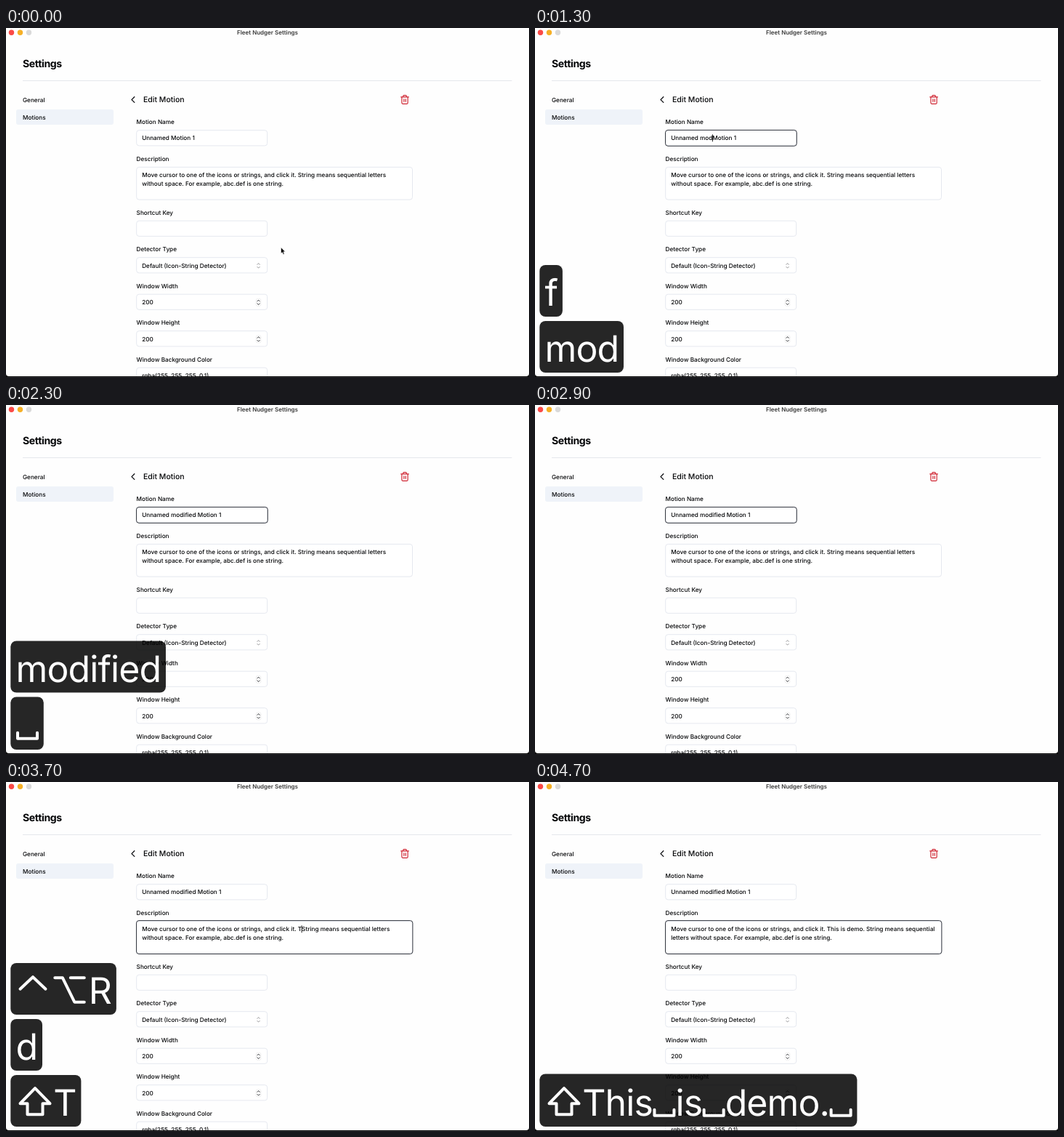
These frames come from a looping animation (720x480 px, 4800 ms). An HTML page:

```html
<!DOCTYPE html>
<html lang="en">
<head>
<meta charset="utf-8">
<title>Settings</title>
<style>
html, body { margin: 0; width: 100%; height: 100%; overflow: hidden; background: #fff; }
svg { display: block; width: 720px; height: 480px; }
text { font: 450 8.2px Inter, sans-serif; fill: #050608; white-space: pre; text-rendering: geometricPrecision; }
.label { font-weight: 540; }
.title { font-size: 8px; font-weight: 600; fill: #3a3a3a; text-anchor: middle; }
.h1 { font-size: 14.1px; font-weight: 700; letter-spacing: -.03em; }
.h2 { font-size: 10.5px; font-weight: 540; }
.key { font-size: 50px; font-weight: 400; letter-spacing: -.9px; fill: #fff; }
.box { fill: #fff; stroke: #e2e6ee; stroke-width: .9; }
.ring { fill: none; stroke: #33363e; stroke-width: 1; }
.line { fill: none; stroke: #0b0c10; stroke-linecap: round; stroke-linejoin: round; }
.glyph { fill: none; stroke: #fff; stroke-width: 4; stroke-linejoin: round; stroke-linecap: round; }
</style>
</head>
<body>
<svg viewBox="0 0 720 480" xml:space="preserve">
<clipPath id="win"><path d="M0 0H720V475Q720 479 716 479H4Q0 479 0 475Z"/></clipPath>
<rect width="720" height="480" fill="#0a0a0a"/>
<g clip-path="url(#win)">
<rect width="720" height="480" fill="#fefefe"/>
<circle cx="7.5" cy="6.3" r="3.7" fill="#fb4a47"/>
<circle cx="19.5" cy="6.3" r="3.7" fill="#f6b026"/>
<circle cx="31.5" cy="6.3" r="3.7" fill="#dadada"/>
<text class="title" x="360" y="8.9">Fleet Nudger Settings</text>
<text class="h1" x="22.9" y="53.7">Settings</text>
<path d="M23 72.5H696.5" stroke="#e5e7ec"/>
<rect x="14" y="112" width="134" height="21" rx="3" fill="#eff3f9"/>
<text class="label" x="23" y="101.5">General</text>
<text class="label" x="23" y="125.5">Motions</text>
<path class="line" d="M176.8 94.8L173 98.6L176.8 102.4" stroke-width="1.3"/>
<text class="h2" x="189" y="102.1">Edit Motion</text>
<path class="line" transform="translate(542 91.4) scale(.586)" style="stroke:#cf2330" stroke-width="2"
 d="M3 6h18M19 6v14c0 1-1 2-2 2H7c-1 0-2-1-2-2V6M8 6V4c0-1 1-2 2-2h4c1 0 2 1 2 2v2M10 11v6M14 11v6"/>
<g id="form"></g>
<g id="live"></g>
</g>
<g id="keys"></g>
<text id="probe" visibility="hidden"></text>
</svg>
<script>
const $ = id => document.getElementById(id);
const text = (s, x, y, cls = '') => `<text class="${cls}" x="${x}" y="${y}">${s}</text>`;
const rect = (x, y, w, h, cls) => `<rect class="${cls}" x="${x}" y="${y}" width="${w}" height="${h}" rx="3.5"/>`;
const line = (d, width = 1) => `<path class="line" d="${d}" stroke-width="${width}"/>`;
const clamp = v => Math.max(0, Math.min(1, v));

function measure(s, cls = '') {
  const probe = $('probe');
  probe.setAttribute('class', cls);
  probe.textContent = s;
  return probe.getComputedTextLength();
}

const LEFT = 187.2;
const arrows = y => line(`M345.9 ${y - 1.5}l1.7 -1.8l1.7 1.8M345.9 ${y + 1.5}l1.7 1.8l1.7 -1.8`, .8);
const spinner = y => `<rect x="344.4" y="${y - 5}" width="6.4" height="10" rx="2" fill="#fff" stroke="#e3e3e3" stroke-width=".6"/>` + arrows(y);

const fields = [
  ['Shortcut Key', ''],
  ['Detector Type', 'Default (Icon-String Detector)', y => `<g opacity=".5">${arrows(y)}</g>`],
  ['Window Width', '200', spinner],
  ['Window Height', '200', spinner],
  ['Window Background Color', 'rgba(255, 255, 255, 0.1)']
];
$('form').innerHTML =
  text('Motion Name', 179.6, 131.9, 'label') + rect(179.7, 140.7, 180, 21.2, 'box') +
  text('Description', 179.6, 182.6, 'label') + rect(179.7, 191.4, 379.8, 44.7, 'box') +
  fields.map(([label, value, extra], i) => {
    const y = 256.6 + i * 50.5;
    return text(label, 179.6, y, 'label') + rect(179.7, y + 8.6, 180, 21.2, 'box') +
      text(value, LEFT, y + 22.5) + (extra ? extra(y + 19.8) : '');
  }).join('');

// Key symbols: advance width and outline from the baseline
const symbols = {
  '^': [50.8, 'M6 -20.5L23.5 -37L41 -20.5'],
  '⌥': [49.5, 'M3 -36H13.5L30 -2.5H43.5M24.5 -36H43.5'],
  '⇧': [51.7, 'M26.5 -38L47 -17H37V-2H16V-17H6Z'],
  '⎵': [31.5, 'M2.5 -8.5V-.5H29.5V-8.5']
};

function keycap(s, bottom, opacity) {
  const h = s.includes('⎵') ? 72.5 : 71;
  let x = 13.5, body = '';
  for (const run of s.split(/([\^⌥⇧⎵])/).filter(Boolean)) {
    const symbol = symbols[run], y = bottom - 14.8;
    body += symbol
      ? `<path class="glyph" transform="translate(${x} ${y})" d="${symbol[1]}"/>`
      : text(run, x, y, 'key');
    x += symbol ? symbol[0] : measure(run, 'key');
  }
  return [h, `<g opacity="${opacity}"><rect x="6.3" y="${bottom - h}" width="${x + .5}" height="${h}" rx="8" fill="#000" fill-opacity=".85"/>${body}</g>`];
}

const typed = (s, t, start) => s.slice(0, Math.max(0, 1 + Math.floor((t - start) / 75)));
const caret = (x, y) => `<path d="M${x} ${y - 5}v10" stroke="#000" stroke-width=".9"/>`;
const beam = (x, y) => line(`M${x - 2} ${y - 4.5}q2 0 2 1.5v6q0 1.5 -2 1.5M${x + 2} ${y - 4.5}q-2 0 -2 1.5v6q0 1.5 2 1.5M${x - 1} ${y + 1.5}h2`, .8);
const pointer = '<path transform="translate(378.5 301.8)" d="M0 0V8.3L1.9 6.6L3.2 9.6L4.7 9L3.4 6H5.9Z" stroke="#fff" stroke-width=".6"/>';

function draw(t) {
  const word = typed('modified', t, 1100);
  const note = typed('This is demo. ', t, 3700);

  // Form contents
  const before = 'Unnamed ' + word + (t >= 1800 ? ' ' : '');
  const intro = 'Move cursor to one of the icons or strings, and click it. ' + note;
  const wrap = note.length > 8;
  let out = text(before + 'Motion 1', LEFT, 154.3) +
    text(intro + 'String means sequential' + (wrap ? '' : ' letters'), LEFT, 205.2) +
    text((wrap ? 'letters ' : '') + 'without space. For example, abc.def is one string.', LEFT, 217.2);

  if (t >= 800 && t < 3400) out += rect(179.5, 140.4, 180.8, 21.9, 'ring');
  if (t >= 3400) out += rect(179.5, 190.6, 380.4, 45.9, 'ring');

  const blink = t < 1900 || (t >= 2400 && t < 2900);
  if (t >= 1100 && blink) out += caret(LEFT + measure(before), 151.3);
  if (t >= 3700 && t < 4700) out += caret(LEFT + measure(intro), 202.3);

  if (t < 800) out += pointer;
  else if (t < 1100) out += beam(228, 151.6);
  else if (t >= 3400 && t < 3700) out += beam(401, 202.6);
  $('live').innerHTML = out;

  // Keycaps: [keys, shown at, last pressed]; newest at the bottom
  const caps = [
    ['^⌥R', 300, 300], ['f', 700, 700], [word, 1100, 1600], ['⎵', 1800, 1800],
    ['^⌥R', 3100, 3100], ['d', 3300, 3300], ['⇧' + note.replace(/ /g, '⎵'), 3700, 4700]
  ];
  let bottom = 474, keys = '';
  for (const [s, on, last] of caps.reverse()) {
    const opacity = clamp(1 - (t - last - 700) / 200);
    if (t < on || !opacity) continue;
    const [h, svg] = keycap(s, bottom, opacity);
    keys += svg;
    bottom -= h + 6;
  }
  $('keys').innerHTML = keys;
}

let shown = -1;
function tick() {
  const t = Math.floor(performance.now() % 4800 / 100) * 100;
  if (t !== shown) draw(shown = t);
  requestAnimationFrame(tick);
}
tick();
</script>
</body>
</html>
```
